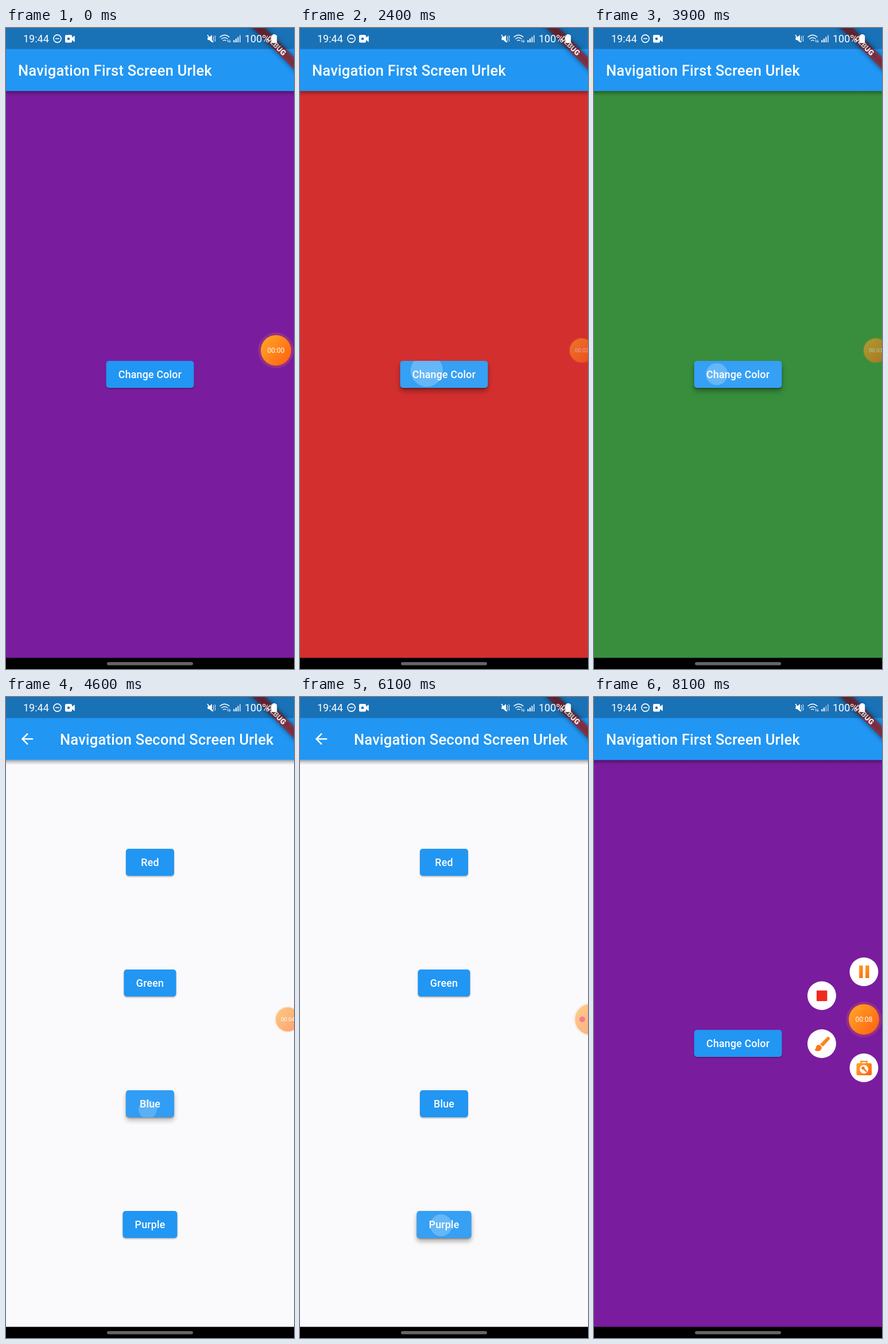
An HTML page that plays this animation: 502 px wide and 1115 px high, repeating every 8.6 s.

```html
<!DOCTYPE html>
<html lang="en">
<head>
<meta charset="utf-8">
<title>Screen navigation</title>
<style>
html, body { margin: 0; width: 100%; height: 100%; overflow: hidden; background: #000; }
svg { display: block; width: 100%; height: 100%; font-family: Roboto, sans-serif; }
.title { font-size: 25.6px; font-weight: 500; letter-spacing: .19px; fill: #fff; }
.label { font-size: 17.9px; font-weight: 500; letter-spacing: .16px; fill: #fff; text-anchor: middle; }
.status { font-size: 18px; fill: #fff; }
</style>
</head>
<body>
<svg id="stage" viewBox="0 0 502 1115">
  <defs>
    <linearGradient id="orange" x1="0" y1=".1" x2="1" y2=".9">
      <stop offset=".1" stop-color="#ff9f26"/><stop offset=".95" stop-color="#ff6510"/>
    </linearGradient>
    <linearGradient id="fall" x1="0" y1="0" x2="0" y2="1">
      <stop offset="0" stop-opacity=".36"/><stop offset=".45" stop-opacity=".15"/><stop offset="1" stop-opacity="0"/>
    </linearGradient>
    <filter id="soft" x="-20%" y="-50%" width="140%" height="200%"><feGaussianBlur stdDeviation="1.2"/></filter>
    <filter id="wide" x="-30%" y="-100%" width="160%" height="300%"><feGaussianBlur stdDeviation="4.5"/></filter>
    <clipPath id="app"><rect width="502" height="1096"/></clipPath>
  </defs>

  <g clip-path="url(#app)">
    <g id="first">
      <rect id="paint" width="502" height="1096"/>
      <rect y="109.6" width="502" height="8.5" fill="url(#fall)"/>
      <rect width="502" height="109.6" fill="#2196f3"/>
      <text class="title" x="21" y="83">Navigation First Screen Urlek</text>
    </g>
    <rect id="scrim" width="502" height="1096" opacity="0"/>
    <g id="second">
      <rect width="502" height="1096" fill="#faf9fb"/>
      <rect y="109.6" width="502" height="8.5" fill="url(#fall)"/>
      <rect width="502" height="109.6" fill="#2196f3"/>
      <path transform="translate(21.6 57.6) scale(1.28)" fill="#fff" d="M20 11H7.83l5.59-5.59L12 4l-8 8 8 8 1.41-1.41L7.83 13H20v-2z"/>
      <text class="title" x="94" y="83">Navigation Second Screen Urlek</text>
    </g>
    <g transform="translate(502 0) rotate(45)">
      <rect x="-90" y="35.8" width="180" height="15.3" opacity=".5" filter="url(#wide)"/>
      <rect x="-90" y="35.8" width="180" height="15.3" fill="#b71c1c" fill-opacity=".63"/>
      <text y="48.1" text-anchor="middle" font-size="13" font-weight="900" fill="#fff">DEBUG</text>
    </g>
  </g>

  <rect width="502" height="36.5" opacity=".25"/>
  <text class="status" x="30" y="24.7">19:44</text>
  <g fill="none" stroke="#fff" stroke-width="1.6">
    <circle cx="89.5" cy="18.5" r="6.6"/>
    <path d="M86 18.5h7"/>
  </g>
  <path fill="#fff" d="M105 12h8q2 0 2 2v2.5l4.8-3.3v11.2l-4.8-3.3v2.4q0 2-2 2h-8q-2 0-2-2v-9.5q0-2 2-2z"/>
  <circle cx="109" cy="18.7" r="2.3" fill="#1a70b6"/>
  <g fill="none" stroke="#fff" stroke-width="1.3">
    <path d="M351.5 16h3l4.5-4v13l-4.5-4h-3z" fill="#fff" stroke="none"/>
    <path d="M351 12l10 13" stroke-width="1.6"/>
    <path d="M361 14l1 2.200-1 2.200 1 2.200-1 2.200M364 13l1 2.700-1 2.700 1 2.700-1 2.700" stroke-width="1"/>
    <path d="M372.500 16q8.500-7.500 17 0M375.300 19.200q5.700-5 11.400 0M378.200 22.300q2.800-2.300 5.600 0"/>
    <path d="M387 25v-4m-1.200 1.200l1.200-1.300M390 20.500v4.500m-1.200-1.400l1.200 1.400 1.200-1.400" stroke-width="1"/>
  </g>
  <g fill="#fff">
    <rect x="396.500" y="21" width="2" height="4"/>
    <rect x="400" y="18.500" width="2" height="6.500"/>
    <rect id="bar3" x="403.500" y="15.500" width="2" height="9.500"/>
    <rect id="bar4" x="407" y="12.500" width="2" height="12.500"/>
    <path d="M465 11h5v1.500h1.200q1 0 1 1v11.500q0 1-1 1h-7.700q-1 0-1-1v-11.500q0-1 1-1h1.500z"/>
  </g>
  <text class="status" x="416" y="24.700">100%</text>
  <rect y="1095.600" width="502" height="19.400"/>
  <rect x="176" y="1103" width="150" height="5.500" rx="2.700" fill="#666"/>

  <g id="menu"></g>
  <g id="bubble">
    <circle id="halo" r="31" fill="#ff7d2a" fill-opacity=".2"/>
    <circle r="26.500" fill="url(#orange)"/>
    <text id="clock" y="4.500" text-anchor="middle" font-size="12" fill="#fff"></text>
    <circle id="dot" cx="-14" r="5" fill="#f50a3c"/>
  </g>
</svg>
<script>
const LOOP = 8600, NAV = 300, CX = 251, CY = 548;
const $ = id => document.getElementById(id);
const clamp = v => Math.min(1, Math.max(0, v));
const span = (t, a, b) => clamp((t - a) / (b - a));
const mix = (a, b, k) => a + (b - a) * k;
const smooth = k => k * k * (3 - 2 * k);

function el(parent, tag, attrs, text) {
  const node = document.createElementNS('http://www.w3.org/2000/svg', tag);
  set(node, attrs);
  if (text) node.textContent = text;
  parent.appendChild(node);
  return node;
}
function set(node, attrs) {
  for (const key in attrs) node.setAttribute(key, attrs[key]);
}

function bezier(x1, y1, x2, y2) {
  const at = (a, b, s) => 3 * a * s * (1 - s) ** 2 + 3 * b * s * s * (1 - s) + s ** 3;
  return x => {
    let lo = 0, hi = 1;
    for (let i = 0; i < 24; i++) {
      const mid = (lo + hi) / 2;
      if (at(x1, x2, mid) < x) lo = mid; else hi = mid;
    }
    return at(y1, y2, lo);
  };
}
const easeA = bezier(.05, 0, .133333, .06);
const easeB = bezier(.208333, .82, .25, 1);
const zoomEase = p => p >= 1 ? 1 : p < 1 / 6 ? .4 * easeA(p * 6) : .4 + .6 * easeB((p - 1 / 6) * 1.2);

// A raised button with press highlight and ripple
function button(page, id, text, cy, w) {
  const box = { x: CX - w / 2, y: cy - 23.5, width: w, height: 47, rx: 5 };
  const deep = el(page, 'rect', { ...box, y: box.y + 6, filter: 'url(#wide)', opacity: 0 });
  el(page, 'rect', { ...box, y: box.y + 1.5, filter: 'url(#soft)', opacity: .3 });
  const clip = el(page, 'clipPath', { id });
  el(clip, 'rect', box);
  el(page, 'rect', { ...box, fill: '#2196f3' });
  const glow = el(page, 'rect', { ...box, fill: '#fff', opacity: 0 });
  const wrap = el(page, 'g', { 'clip-path': `url(#${id})` });
  const splash = el(wrap, 'circle', { fill: '#fff', opacity: 0 });
  el(page, 'text', { class: 'label', x: CX, y: cy + 6.7 }, text);
  return { deep, glow, splash };
}
const change = button($('first'), 'bChange', 'Change Color', 602.5, 153);
const red = button($('second'), 'bRed', 'Red', 287.5, 84);
const green = button($('second'), 'bGreen', 'Green', 497.5, 91);
const blue = button($('second'), 'bBlue', 'Blue', 707.5, 84);
const purple = button($('second'), 'bPurple', 'Purple', 917.5, 95);
const buttons = [change, red, green, blue, purple];

// button, down, up, x, y, ripple speed
const presses = [
  [change, 60, 430, 228, 600, .1],
  [red, 1270, 1680, 240, 290, .1],
  [change, 2180, 2400, 221, 596, .1],
  [green, 3150, 3320, 234, 499, .08],
  [change, 3770, 4080, 214, 602, .1],
  [blue, 4530, 4690, 247, 717, .143],
  [change, 5180, 5310, 205, 609, .086],
  [purple, 5970, 6280, 246, 919, .1]
];
const PURPLE = '#7a1c9e', RED = '#d32f2f', GREEN = '#388e3c', BLUE = '#1976d2';
// start, push or pop, colour of the first page
const moves = [
  [-NAV, 0, PURPLE],
  [450, 1, PURPLE], [1680, 0, RED],
  [2400, 1, RED], [3320, 0, GREEN],
  [4080, 1, GREEN], [4690, 0, BLUE],
  [5390, 1, BLUE], [6280, 0, PURPLE]
];

function menuItem(x, y, draw) {
  const g = el($('menu'), 'g', {});
  el(g, 'circle', { r: 25, fill: '#fff' });
  draw(g);
  return { g, x, y };
}
const fill = 'url(#orange)';
const items = [
  menuItem(470.5, 478, g => {
    for (const x of [-8.5, 2.5]) el(g, 'rect', { x, y: -11, width: 6.5, height: 22, rx: 1, fill });
  }),
  menuItem(397, 519.5, g => el(g, 'rect', { x: -9, y: -9, width: 18.5, height: 18.5, rx: 1, fill: '#ee2a1e' })),
  menuItem(397, 603, g => {
    el(g, 'path', { d: 'M-3 1L9-11q2-2 4 0t0 4L2 5z', fill });
    el(g, 'path', { d: 'M-5 2q4 1 5 5-1 6-7 6-4 0-6-3 3 0 3-4 1-4 5-4z', fill: '#ff7418' });
  }),
  menuItem(470.5, 645, g => {
    el(g, 'path', { d: 'M-5-7v-4h10v4', fill: 'none', stroke: '#ff8c1e', 'stroke-width': 2.5 });
    el(g, 'rect', { x: -13, y: -8, width: 26.5, height: 21, rx: 2.5, fill });
    el(g, 'circle', { cy: 2.5, r: 7.5, fill: '#fff' });
    el(g, 'path', { d: 'M-1 1L4 6', stroke: '#ff7418', 'stroke-width': 2.6, 'stroke-linecap': 'round' });
    el(g, 'circle', { cx: -1.5, cy: .5, r: 2.8, fill: '#ff7418' });
  })
];

function zoom(node, s, opacity) {
  set(node, {
    transform: `translate(${CX} ${CY}) scale(${s}) translate(${-CX} ${-CY})`,
    opacity, display: opacity > 0 ? 'inline' : 'none'
  });
}

function drawPages(t) {
  const [start, push, colour] = moves.filter(m => m[0] <= t).pop();
  const p = clamp((t - start) / NAV), k = zoomEase(p);
  $('paint').setAttribute('fill', colour);
  if (push) {
    zoom($('first'), 1 + .05 * k, p < 1 ? 1 : 0);
    zoom($('second'), .85 + .15 * k, span(p, .125, .25));
  } else {
    zoom($('first'), 1.1 - .1 * k, 1);
    zoom($('second'), 1 - .1 * k, 1 - span(p, .0825, .2075));
  }
  $('scrim').setAttribute('opacity', push ? .6 * span(p, .2075, .4175) : 0);
}

function drawPresses(t) {
  for (const b of buttons) for (const part of Object.values(b)) part.setAttribute('opacity', 0);
  for (const [b, down, up, x, y, speed] of presses) {
    if (t < down || t > up + 220) continue;
    const held = span(t, down, down + 90) * (1 - span(t, up, up + 220));
    const lift = span(t, down, down + 90) * (1 - span(t, up, up + 100));
    set(b.deep, { opacity: .3 * lift });
    set(b.glow, { opacity: .09 * held });
    set(b.splash, { cx: x, cy: y, r: 6 + speed * (t - down), opacity: .24 * held });
  }
}

function drawRecorder(t) {
  const dock = smooth(span(t, 1700, 1950)), hide = smooth(span(t, 4920, 5120));
  const back = smooth(span(t, 7330, 7440));
  const x = mix(mix(mix(470.5, 491, dock), 506, hide), 470.5, back);
  const s = mix(mix(mix(1, .79, dock), 1, hide), 1, back);
  const alpha = mix(mix(mix(1, .58, dock), .53, hide), 1, back);
  set($('bubble'), { transform: `translate(${x} 560.8) scale(${s})`, opacity: alpha });
  set($('halo'), { r: mix(mix(31, 29, dock), 31, back) });
  set($('clock'), { opacity: mix(1 - hide, 1, back) });
  set($('dot'), { opacity: hide * (1 - back) });
  $('clock').textContent = '00:0' + Math.max(0, Math.floor((t - 60) / 1000));

  const open = smooth(span(t, 7420, 7690));
  $('menu').setAttribute('display', open > 0 ? 'inline' : 'none');
  for (const { g, x, y } of items) {
    set(g, { transform: `translate(${mix(470.5, x, open)} ${mix(561, y, open)}) scale(${mix(.3, 1, open)})`, opacity: open });
  }
}

function render(t) {
  drawPages(t);
  drawPresses(t);
  drawRecorder(t);
  $('bar3').setAttribute('opacity', t < 6800 ? .9 : .5);
  $('bar4').setAttribute('opacity', t < 6800 ? .65 : .45);
}

const began = performance.now();
function tick() {
  render((performance.now() - began) % LOOP);
  requestAnimationFrame(tick);
}
tick();
</script>
</body>
</html>
```
